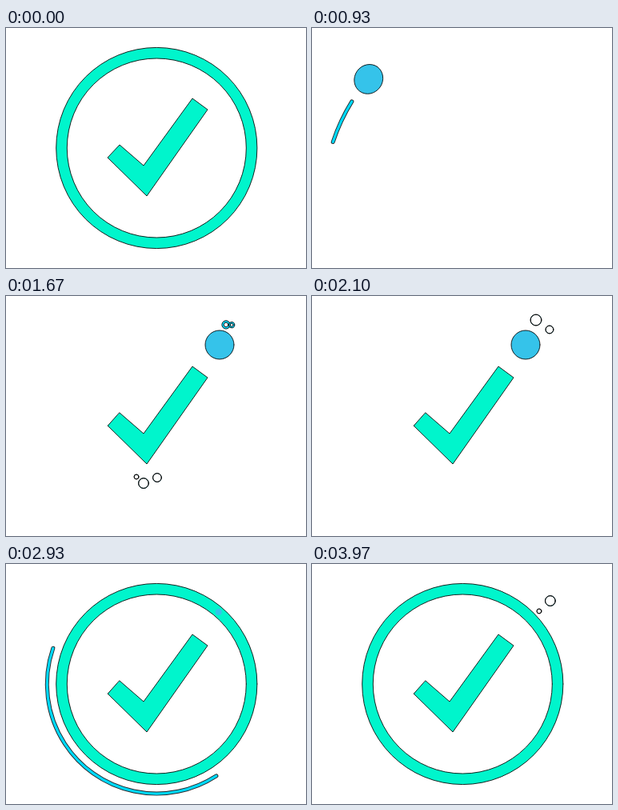
Recreate the animation shown at these times as an HTML page with a canvas. Size 375 by 300 pixels, loop 4010 ms.

```html
<!DOCTYPE html>
<html lang="en">
<head>
<meta charset="utf-8">
<title>Check mark</title>
<style>
  html, body { margin: 0; width: 100%; height: 100%; overflow: hidden; background: #fff; }
  canvas { display: block; width: 375px; height: 300px; }
</style>
</head>
<body>
<canvas id="stage" width="375" height="300"></canvas>
<script>
const ctx = document.getElementById('stage').getContext('2d');
const LOOP = 4010, HOLD = 500;
const MINT = '#00f5cc', BLUE = '#35c3ea', CYAN = '#00d9fb', EDGE = 'rgba(0,0,0,.85)';
const TAU = Math.PI * 2;

const ring = { x: 188.3, y: 150, inner: 112, outer: 125.6, mid: 118.8, trail: 137, start: -49.3 };
const tickOuter = [[127, 162], [176, 210], [252, 102]];
const tickInner = [[142, 146], [172, 172], [233, 88]];

// Degrees travelled along the ring
const sweepKeys = [[2150, 0], [2470, 92.5], [2600, 181], [2720, 262], [2900, 360]];
const headKeys = [[2200, 0], [2470, 66], [2930, 248], [3250, 360]];
const tailKeys = [[2400, 0], [2470, 6.6], [2930, 106], [3150, 215], [3500, 360]];

// Bubbles: birth, death, from x/y, to x/y, radius
const bubbles = [
  [960, 1310, 71, 62, 60.5, 53.6, 5.1],
  [960, 1310, 71, 62, 77.3, 46.2, 4],
  [1240, 1850, 174, 205, 162, 228, 3.1],
  [1240, 1850, 174, 205, 171.8, 236.8, 6.7],
  [1240, 1850, 174, 205, 190.4, 229.1, 5.7],
  [1560, 2130, 272.4, 39.1, 280, 30, 7],
  [1560, 2130, 274, 33, 297, 42, 5],
  [3500, 4010, 275, 55, 298, 46, 6.5],
  [3500, 4010, 275, 55, 284, 59, 3]
];

const rad = d => d * Math.PI / 180;
const mix = (a, b, p) => a + (b - a) * p;
const mixPt = (a, b, p) => [mix(a[0], b[0], p), mix(a[1], b[1], p)];
const phase = (t, a, b) => Math.min(1, Math.max(0, (t - a) / (b - a)));
const easeOut = p => 1 - (1 - p) * (1 - p);

// Smooth curve through keys, at rest at both ends
function track(t, keys) {
  const last = keys.length - 1;
  if (t <= keys[0][0]) return keys[0][1];
  if (t >= keys[last][0]) return keys[last][1];
  const slope = i => i === 0 || i === last ? 0 :
    (keys[i + 1][1] - keys[i - 1][1]) / (keys[i + 1][0] - keys[i - 1][0]);
  let i = 0;
  while (t > keys[i + 1][0]) i++;
  const [ta, va] = keys[i], [tb, vb] = keys[i + 1];
  const d = tb - ta, p = (t - ta) / d, q = 1 - p;
  return va * (1 + 2 * p) * q * q + vb * p * p * (3 - 2 * p) +
    d * p * q * (slope(i) * q - slope(i + 1) * p);
}

const legTwo = t => easeOut(phase(t, 1228, 1640));

function ballAt(t) {
  if (t < 950) {
    const p = easeOut(phase(t, HOLD, 950)), q = 1 - p;
    return [q * q * 45 + 2 * p * q * 5 + p * p * 71,
            q * q * 322 + 2 * p * q * 165 + p * p * 63.5];
  }
  if (t < 1140) return mixPt([71, 63.5], [134.5, 154], phase(t, 950, 1140) ** 2);
  if (t < 1228) return mixPt([134.5, 154], [174, 190], phase(t, 1140, 1228));
  if (t < 2150) return mixPt([174, 190], [267, 61], legTwo(t));
  const a = rad(ring.start + track(t, sweepKeys));
  const r = mix(120, ring.mid, phase(t, 2150, 2250));
  return [ring.x + r * Math.cos(a), ring.y + r * Math.sin(a)];
}

function paint(fill, rule = 'nonzero') {
  ctx.fillStyle = fill;
  ctx.fill(rule);
  ctx.lineWidth = 1;
  ctx.strokeStyle = EDGE;
  ctx.stroke();
}

function circle(x, y, r) {
  ctx.moveTo(x + r, y);
  ctx.arc(x, y, r, 0, TAU);
}

function trail() {
  ctx.lineCap = 'round';
  for (const [w, c] of [[5, EDGE], [3.2, CYAN]]) {
    ctx.lineWidth = w;
    ctx.strokeStyle = c;
    ctx.stroke();
  }
}

function arcTrail(x, y, r, from, to) {
  if (to - from < 0.3) return;
  ctx.beginPath();
  ctx.arc(x, y, r, rad(from), rad(to));
  trail();
}

function drawTrails(t) {
  if (t < 1000) {
    arcTrail(254, 218, 240,
      mix(155, 220, phase(t, 700, 1000) ** 1.55),
      mix(155, 220, phase(t, 560, 1000) ** 0.8));
  }
  const head = phase(t, 1170, 1350), tail = phase(t, 1210, 1390);
  if (head > tail) {
    const a = [115.5, 164.5], b = [162, 210];
    ctx.beginPath();
    ctx.moveTo(...mixPt(a, b, tail));
    ctx.lineTo(...mixPt(a, b, head));
    trail();
  }
  arcTrail(ring.x, ring.y, ring.trail,
    ring.start + track(t, tailKeys), ring.start + track(t, headKeys));
}

function drawBubbles(t) {
  for (const [t0, t1, x0, y0, x1, y1, size] of bubbles) {
    if (t < t0 || t >= t1) continue;
    const p = phase(t, t0, t1), e = easeOut(p);
    const r = size * (0.6 + 0.4 * e);
    const x = mix(x0, x1, e), y = mix(y0, y1, e);
    ctx.beginPath();
    circle(x, y, r);
    circle(x, y, r * Math.min(0.96, 1.2 * Math.sqrt(p)));
    paint(CYAN, 'evenodd');
  }
}

// Length runs from 0 to 2, one unit per leg
function drawTick(len) {
  if (len <= 0) return;
  const cut = side => {
    const i = len > 1 ? 1 : 0;
    return [...side.slice(0, i + 1), mixPt(side[i], side[i + 1], len - i)];
  };
  ctx.beginPath();
  for (const p of [...cut(tickOuter), ...cut(tickInner).reverse()]) ctx.lineTo(...p);
  ctx.closePath();
  paint(MINT);
}

function drawRing(sweep) {
  if (sweep <= 0) return;
  const { x, y, inner, outer } = ring;
  ctx.beginPath();
  if (sweep >= 359.5) {
    circle(x, y, outer);
    circle(x, y, inner);
  } else {
    const a = rad(ring.start), b = rad(ring.start + sweep);
    ctx.arc(x, y, outer, a, b);
    ctx.arc(x, y, inner, b, a, true);
    ctx.closePath();
  }
  paint(MINT, 'evenodd');
}

function drawBall(t) {
  const r = 18 * (1 - phase(t, 2830, 2960));
  if (r <= 0) return;
  const [x, y] = ballAt(t);
  const [ax, ay] = ballAt(t - 25), [bx, by] = ballAt(t + 25);
  const speed = Math.hypot(bx - ax, by - ay) / 50;
  const stretch = 1 + 0.4 * Math.min(1, speed / 0.38);
  ctx.beginPath();
  ctx.ellipse(x, y, r * stretch, r / stretch ** 0.6, Math.atan2(by - ay, bx - ax), 0, TAU);
  if (r > 8) return paint(BLUE);
  ctx.fillStyle = BLUE;
  ctx.fill();
}

function draw(t) {
  ctx.fillStyle = '#fff';
  ctx.fillRect(0, 0, 375, 300);
  if (t < HOLD) {
    drawRing(360);
    drawTick(2);
    return;
  }
  drawTrails(t);
  drawBubbles(t);
  drawRing(track(t, sweepKeys));
  drawTick(t < 1228 ? phase(t, 1140, 1228) : Math.min(2, 1 + legTwo(t) / 0.735));
  drawBall(t);
}

const begin = performance.now();
function loop() {
  draw((performance.now() - begin) % LOOP);
  requestAnimationFrame(loop);
}
loop();
</script>
</body>
</html>
```
